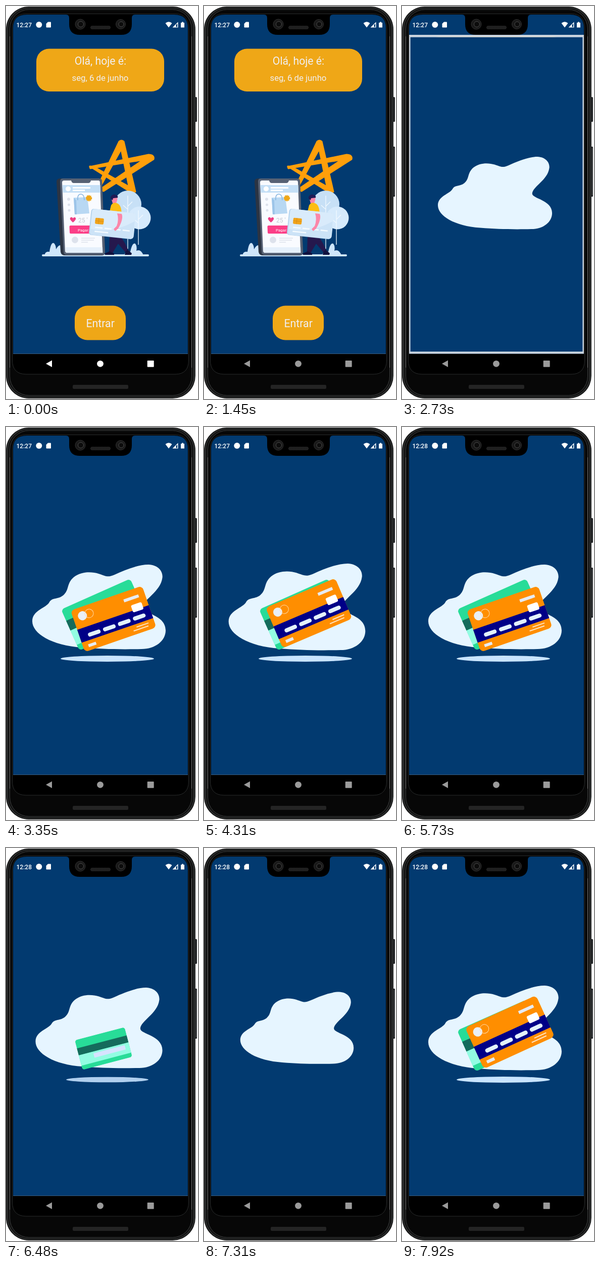
An HTML page for the animation above (7990 ms loop, 380 by 777 pixels).

```html
<!DOCTYPE html>
<html lang="pt">
<head>
<meta charset="utf-8">
<style>
html, body { margin: 0; width: 100%; height: 100%; overflow: hidden; background: #fff; }
svg { display: block; width: 380px; height: 777px; }
text { font-family: Roboto, sans-serif; }
</style>
</head>
<body>
<svg viewBox="0 0 380 777">
<defs>
  <linearGradient id="edge">
    <stop offset="0" stop-color="#222"/><stop offset=".015" stop-color="#111"/>
    <stop offset=".985" stop-color="#111"/><stop offset="1" stop-color="#2b2d2d"/>
  </linearGradient>
  <pattern id="mesh" width="3" height="3" patternUnits="userSpaceOnUse">
    <rect width="3" height="3" fill="#151515"/><path d="M0 3 3 0" stroke="#3c3c3c" stroke-width=".8"/>
  </pattern>
  <clipPath id="app"><rect x="14" y="57" width="346" height="630.5"/></clipPath>
  <clipPath id="greenClip"><rect x="-75" y="-44.5" width="150" height="89" rx="7"/></clipPath>
  <clipPath id="orangeClip"><rect x="-75" y="-43.5" width="150" height="87" rx="8"/></clipPath>
</defs>

<!-- device -->
<rect x="372" y="180" width="6" height="49" rx="1.5" fill="#202224"/>
<rect x="372" y="278" width="6" height="99" rx="1.5" fill="#202224"/>
<path d="M376.5 281V374" stroke="#55585a"/>
<rect x="0" y="1" width="375" height="775" rx="45" fill="url(#edge)"/>
<rect x="3" y="3.5" width="369" height="770" rx="42" fill="none" stroke="#2e3030" stroke-width="2"/>
<rect x="7.5" y="7" width="360" height="763" rx="38" fill="#070707" stroke="#3d3f3f"/>
<path d="M7.5 60V715M367.5 60V715" stroke="#777"/>
<path d="M12.5 46Q12.5 15.5 40 15.5H335Q361.5 15.5 361.5 46V700Q361.5 728 335 728H40Q12.5 728 12.5 700Z" fill="#000" stroke="#2a2c2c"/>
<path d="M14 687.5V44Q14 17 41 17H119Q125 17 125 24V36Q125 57 146 57H228Q249 57 249 36V24Q249 17 255 17H333Q360 17 360 44V687.5Z" fill="#023a70"/>
<g fill="#191919" stroke="#303030">
  <circle cx="147" cy="36" r="10"/><circle cx="227" cy="36" r="9.5"/>
  <circle cx="148" cy="36" r="5.5" fill="#0c0c0c" stroke="#4b4b4b"/><circle cx="228" cy="36" r="5" fill="#0c0c0c" stroke="#4b4b4b"/>
</g>
<rect x="167" y="39" width="40" height="7" rx="3.5" fill="url(#mesh)"/>
<rect x="132" y="749" width="110" height="8" rx="2.5" fill="#242424"/>

<!-- status bar -->
<g fill="#fff">
  <text id="clock" x="20.5" y="42" font-size="12" font-weight="500">12:27</text>
  <circle cx="65.3" cy="37" r="6"/>
  <path d="M83 31.5H88Q89 31.5 89 32.5V41.5Q89 42.5 88 42.5H80.500Q79.500 42.500 79.500 41.500V35Z"/>
  <path d="M315.500 34Q322 28.500 328.500 34L322 42.500Z"/>
  <path d="M329.500 42.500 340.500 31.500V42.500Z"/>
  <path d="M336.500 37V41.500H339V35Z" fill="#023a70"/>
  <path d="M346 33H348V31.500H351V33H353V42.500H346Z"/>
</g>

<!-- navigation bar -->
<g id="nav">
  <path d="M91 700.500V714L79 707.300Z"/><circle cx="186.500" cy="707.300" r="6.400"/>
  <rect x="279.700" y="701" width="13" height="12.800" rx="1"/>
</g>

<g clip-path="url(#app)">
<rect id="wash" x="14" y="57" width="346" height="631" fill="#e1e5eb"/>

<g id="home">
  <rect x="14" y="57" width="346" height="631" fill="#023a70"/>
  <rect x="60" y="84.500" width="253" height="84.500" rx="25" fill="#efa717"/>
  <g fill="#f0eff2" text-anchor="middle">
    <text x="187" y="115.500" font-size="21.200">Olá, hoje é:</text>
    <text x="186.500" y="147.500" font-size="16.800">seg, 6 de junho</text>
  </g>

  <g fill="#ff9f0a" stroke="#ff9f0a" stroke-linejoin="round" stroke-width="3">
    <path d="M224 268Q229 264 233 268L256 367 246 370 228 283 184 362 179 362Z"/>
    <path d="M166 318 282 294Q294 294 292 303L193 366 187 362 272 304 167 321Z"/>
    <path d="M166 317 174 318 252 362 250 370Z"/>
  </g>

  <!-- trees, ground and bushes -->
  <circle cx="241" cy="392" r="27" fill="#c7e0f6"/>
  <circle cx="264" cy="419" r="22.500" fill="#d6eafc"/>
  <g fill="none" stroke="#f2f9ff" stroke-width="1.300">
    <path d="M241 375V480M241 396 250 387M241 402 232 394M262 404V472M262 422 271 413M262 429 253 421"/>
  </g>
  <path d="M73 493H281" stroke="#cfe6fb" stroke-width="4" stroke-linecap="round"/>
  <path d="M76 493Q78 484 86 486Q89 466 95 469Q99 473 99 481Q105 470 110 474Q112 478 110 484Q119 482 121 493ZM233 493Q239 481 246 486Q250 467 256 470Q260 475 258 484Q267 480 272 493Z" fill="#cfe6fb"/>

  <!-- shop phone -->
  <path d="M100 347Q100 342 106 341L184 341Q190 341 190 347L196 486Q196 493 190 493H116Q109 493 108 486Z" fill="#2b3443"/>
  <path d="M107 347Q107 341 112 341H184Q190 341 190 347L196 486Q196 492 190 492H120Q114 492 114 486Z" fill="#566174"/>
  <path d="M111 349Q111 345 115 345H129Q130 350 134 350H163Q167 350 168 345H183Q186 345 186 349L191 484Q191 488 187 488H121Q117 488 117 484Z" fill="#f9fbff"/>
  <path d="M111.500 354H186.500L187 369H112.500Z" fill="#c4dff6"/>
  <circle cx="123" cy="361.500" r="5" fill="#fff"/>
  <path d="M132 359.500H167M132 364.500H156" stroke="#fff" stroke-width="3"/>
  <path d="M134 379 161 378 165 410 136 412Z" fill="#b8d8f3"/>
  <path d="M134 379 139 384 140 412H136Z" fill="#9cc4e8"/>
  <path d="M142 384Q141 371 149 372Q155 373 155 384" fill="none" stroke="#87b5df" stroke-width="1.500"/>
  <circle cx="164" cy="380" r="5" fill="#efa717" stroke="#efa717" stroke-width="2.500" stroke-dasharray="2 1.200"/>
  <g fill="#dde2ec"><circle cx="124" cy="382" r="3"/><circle cx="124.500" cy="393" r="2.500"/><circle cx="125" cy="404" r="2.500"/><circle cx="136.500" cy="462.500" r="6.500"/></g>
  <path d="M132.500 428Q123 420 129 417.500 132 417.500 132.500 420 134 417 137 418 141 421 132.500 428Z" fill="#ef3f85"/>
  <text x="143" y="427.500" font-size="12" fill="#c3c7d1">25 '</text>
  <path d="M128 434H177L178 450H128Q126 450 126 448L125.500 436Q125.500 434 128 434Z" fill="#fb3f87"/>
  <text x="142" y="445.500" font-size="8" fill="#fff">Pagar</text>
  <path d="M149 459H176M149 463H174M149 467H162" stroke="#dde2ec" stroke-width="1.500"/>
  <path d="M118 477H191L191.500 488H121Q118 488 118 484Z" fill="#e5f0fb"/>

  <!-- shopper -->
  <path d="M205 452H225L236 470 243 486 238 489 222 470 211 488 204 488Z" fill="#25184d"/>
  <path d="M196 489 205 485 214 489V492H196ZM236 486 241 482 249 489 248 492H235Z" fill="#11123f"/>
  <path d="M208 379Q209 373 216 374Q222 376 220 384L218 390H211Z" fill="#fb86a9"/>
  <path d="M207 381Q206 374 214 372.500Q223 374 221 379L212 380 211 384Z" fill="#1f1a55"/>
  <path d="M208 394Q213 386 222 391Q229 396 229 414L218 418 205 406Z" fill="#fdbd12"/>
  <g transform="translate(210 431) rotate(6)">
    <rect x="-44" y="-26" width="88" height="52" rx="5" fill="#b6d4ee"/>
    <rect x="-42" y="-26" width="87" height="51" rx="5" fill="#d9ebfb"/>
    <path d="M-42 14Q0 20 44 -10V20Q44 25 39 25H-37Q-42 25-42 20Z" fill="#cce3f7"/>
    <rect x="-34" y="-9" width="17" height="12" rx="2" fill="#f1a41b"/>
    <path d="M-34-3H-17M-27-9V3" stroke="#d68c14" stroke-width=".8"/>
    <path d="M-33 10H-18M-14 10H0M5 10H18M22 10H36M-33 18H-6" stroke="#f5fbff" stroke-width="2.500"/>
  </g>
  <path d="M220 410 229 411Q233 421 222 440L216 445 213 441 219 435Q224 422 220 410Z" fill="#fb86a9"/>

  <g id="button">
    <rect x="136" y="592.500" width="101" height="68" rx="25" fill="#efa717"/>
    <text x="186.700" y="635" font-size="21.300" fill="#f0eff2" text-anchor="middle">Entrar</text>
  </g>
</g>

<g id="loading">
  <rect x="14" y="57" width="346" height="631" fill="#023a70"/>
  <g id="scene">
    <ellipse id="shadow" rx="92.500" ry="6" fill="#c9e4ff"/>
    <path id="blob" fill="#e6f5ff" d="M52 384C52 362 80 358 86 346C91 337 103 341 113 333C126 322 119 310 134 297C149 285 170 286 183 290C198 295 201 298 215 292C237 282 262 272 282 272C302 273 311 286 309.500 298C306 326 271 341 270 357C270 369 316 371 316 402C316 423 295 439 268 439C222 440 190 439 150 436C90 432 52 408 52 384Z"/>
    <g id="green"><g clip-path="url(#greenClip)">
      <rect x="-75" y="-45" width="150" height="90" fill="#28dc98"/>
      <rect x="-75" y="-20" width="150" height="21" fill="#156b5c"/>
      <rect x="-75" y="1" width="150" height="31" fill="#92fce2"/>
      <rect x="-32" y="6" width="94" height="13" fill="#d6e3ff"/>
    </g></g>
    <g id="orange"><g clip-path="url(#orangeClip)">
      <rect x="-75" y="-44" width="150" height="88" fill="#ff8e00"/>
      <rect x="-75" y="-3" width="150" height="27" fill="#000087"/>
      <path d="M-54 14H-36M-22.500 14H-4.500M9 13.500H27M40.500 13H58.500" stroke="#e3f2fb" stroke-width="8" stroke-linecap="round"/>
      <rect x="41" y="-14" width="22" height="15" rx="3" fill="#fff"/>
      <circle cx="-56" cy="-26" r="9" fill="#e9eff8"/>
      <circle cx="-42" cy="-26" r="8.500" fill="none" stroke="#ffdcae"/>
      <path d="M31-27H62M-64 34H-48" stroke="#e6ebf3" stroke-width="6"/>
      <path d="M38 30H63M30 35.500H61" stroke="#ffe3c0" stroke-width="2"/>
    </g></g>
  </g>
</g>
</g>
</svg>

<script>
const LOOP = 7990, STEP = 68, OPEN = 2600;
const starts = [OPEN, 3750, 4980, 6130, 7310];
const navSteps = [[1450, 155], [1180, 168], [960, 182], [750, 198], [540, 214], [200, 236], [130, 246], [0, 255]];
const $ = id => document.getElementById(id);
const set = (id, name, value) => $(id).setAttribute(name, value);

// Linear interpolation through [time, value] points, held at both ends.
function key(t, ...points) {
  let [t0, v0] = points[0];
  for (const [t1, v1] of points) {
    if (t < t1) return t <= t0 ? v0 : v0 + (v1 - v0) * (t - t0) / (t1 - t0);
    [t0, v0] = [t1, v1];
  }
  return v0;
}

const zoom = (id, s, x, y) => set(id, 'transform', `translate(${x} ${y}) scale(${s}) translate(${-x} ${-y})`);
const place = (id, x, y, s, angle = 0) => set(id, 'transform', `translate(${x} ${y}) rotate(${angle}) scale(${s})`);

function drawScene(d) {
  const grow = d < 490 ? .85 + .195 * (d / 490) ** 1.8 : key(d, [490, 1.045], [612, 1]);
  zoom('blob', grow, 184, 356);

  const shade = key(d, [136, 0], [204, .36], [272, .65], [340, .88], [430, 1]);
  place('shadow', 200.5, 458, shade);
  set('shadow', 'opacity', shade);

  place('green',
    key(d, [272, 194], [340, 193], [510, 195.5]),
    key(d, [136, 445], [272, 413.5], [340, 396.5], [510, 371]),
    key(d, [136, 0], [272, .5], [340, .68], [500, 1]),
    key(d, [136, -5], [272, -11], [340, -14.7], [510, -24]));

  place('orange',
    key(d, [408, 196], [612, 213.5], [748, 212.7]),
    key(d, [340, 410], [408, 395], [544, 368], [612, 364], [748, 379.5]),
    key(d, [350, 0], [408, .5], [476, .8], [544, 1], [612, 1.03], [748, 1]),
    key(d, [340, -8], [408, -12], [544, -23], [612, -24.5], [748, -19]));
}

function draw(t) {
  const level = navSteps.find(([at]) => t >= at)[1];
  set('nav', 'fill', `rgb(${level},${level},${level})`);
  $('clock').textContent = t < 5400 ? '12:27' : '12:28';
  set('button', 'opacity', t < 2390 ? 1 : .35);

  const open = t >= OPEN;
  set('loading', 'display', open ? 'inline' : 'none');
  const step = at => Math.floor((t - at + 10) / STEP) * STEP;
  const d = open ? step(OPEN) : -STEP;
  set('home', 'opacity', key(d, [-STEP, 1], [0, .7], [68, .4], [136, .1], [204, 0]));
  zoom('home', key(d, [-STEP, 1], [0, 1.03], [136, 1.085]), 187, 372);
  if (!open) return;

  set('loading', 'opacity', key(d, [0, .25], [68, .7], [136, 1]));
  zoom('loading', key(d, [0, .9], [68, .96], [136, .985], [204, 1]), 187, 372);
  set('scene', 'transform', `translate(0 ${d < 204 ? 14 : 0})`);
  drawScene(Math.min(748, step(starts.findLast(at => t >= at))));
}

function frame(now) {
  draw(now % LOOP);
  requestAnimationFrame(frame);
}
draw(0);
requestAnimationFrame(frame);
</script>
</body>
</html>
```
